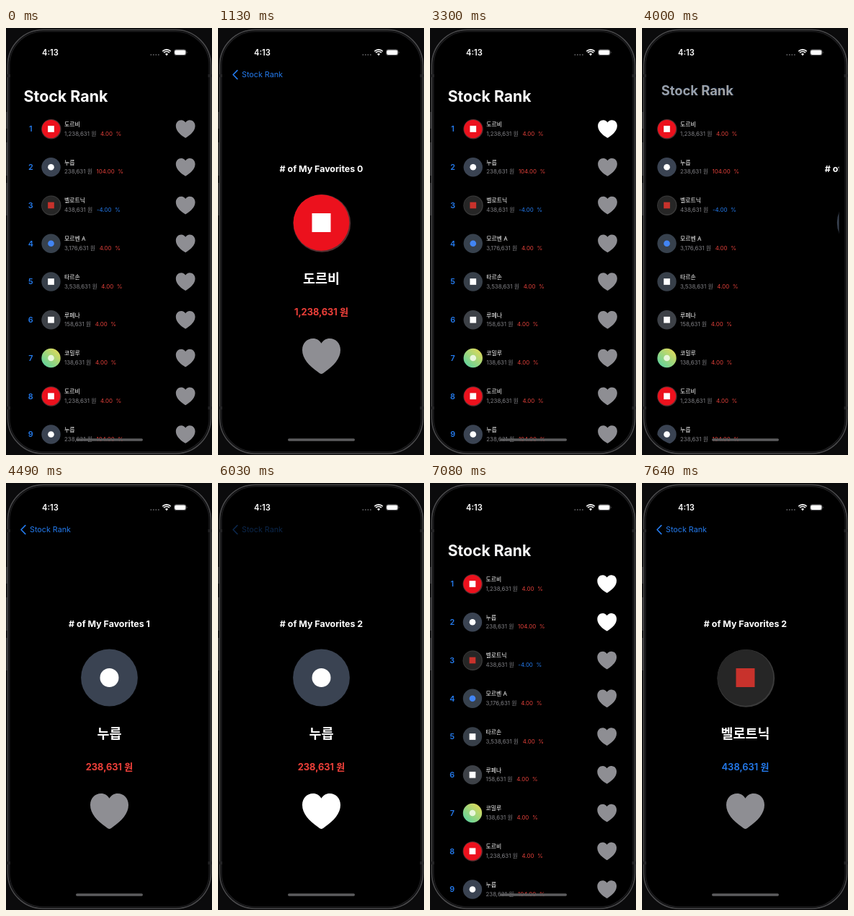
These frames come from a looping animation (286 by 590 pixels, 8000 ms). An HTML page:

```html
<!DOCTYPE html>
<html lang="ko">
<head>
<meta charset="utf-8">
<title>Stock Rank</title>
<style>
  html, body { margin: 0; width: 100%; height: 100%; overflow: hidden; background: #0b0b0c; }
  svg { display: block; width: 286px; height: 590px; }
  text { font-family: Inter, "Noto Sans CJK KR", "Noto Sans CJK", sans-serif; white-space: pre; }
</style>
</head>
<body>
<svg id="stage" viewBox="0 0 286 590"></svg>
<script>
const LOOP = 8000, TICK = 70, PHASE = 10;
const LEFT = 13.5, WIDTH = 260, MID = 143.5;
const BLUE = '#247bee', RED = '#e2403a', GRAY = '#8e8e93';

// name, price, change, disc, mark colour, mark shape, rim
const stocks = [
  ['도르비', '1,238,631', '4.00', '#ec111d', '#fff', 'square', '#553032'],
  ['누릅', '238,631', '104.00', '#3a4352', '#fff', 'circle'],
  ['벨로트닉', '438,631', '-4.00', '#262626', '#c8322c', 'square', '#3a3a3a'],
  ['모르벤 A', '3,176,631', '4.00', '#37414d', '#4285f4', 'circle'],
  ['타르손', '3,538,631', '4.00', '#373f49', '#fff', 'square'],
  ['루페나', '158,631', '4.00', '#3d4147', '#fff', 'square'],
  ['코밀루', '138,631', '4.00', 'url(#meadow)', '#e9f7dc', 'circle'],
].map(([name, price, change, disc, mark, shape, rim]) =>
  ({ name, price: price + ' 원', change, disc, mark, shape, rim,
     tone: change[0] === '-' ? BLUE : RED }));

// start, end, time already run at the first step, direction
const moves = [
  [500, 1130, 12, 1],
  [3020, 3510, 90, 0],
  [4000, 4490, 90, 1],
  [6170, 6660, 90, 0],
  [7080, 7640, 24, 1],
];
const taps = [[1900, 2250], [4980, 5400]];
const presses = [[2880, 3020], [6030, 6170]];
const pageEnds = [3510, 6660, Infinity];

const label = (x, y, size, str, attrs = '') =>
  `<text x="${x}" y="${y + size * 0.36}" font-size="${size}" fill="#fff" ${attrs}>${str}</text>`;

const centered = (y, size, str, attrs = '') =>
  label(MID, y, size, str, `text-anchor="middle" font-weight="600" ${attrs}`);

function badge(s, x, y, r) {
  const m = r * 0.33, o = r * 0.02;
  const rim = s.rim ? `<circle cx="${x + o}" cy="${y + o}" r="${r + 0.5}" fill="${s.rim}"/>` : '';
  const inner = s.rim ? r - 0.6 : r;
  const mark = s.shape === 'circle'
    ? `<circle cx="${x}" cy="${y}" r="${m}" fill="${s.mark}"/>`
    : `<rect x="${x - m}" y="${y - m}" width="${2 * m}" height="${2 * m}" fill="${s.mark}"/>`;
  return `${rim}<circle cx="${x}" cy="${y}" r="${inner}" fill="${s.disc}"/>${mark}`;
}

const heart = (x, y, k, cls) =>
  `<use href="#heart" class="${cls}" fill="${GRAY}" transform="translate(${x} ${y}) scale(${k})"/>`;

function row(i) {
  const s = stocks[i % stocks.length], y = 139.5 + 52.75 * i;
  return label(34.3, y, 10.8, i + 1, `text-anchor="middle" font-weight="600" style="fill:${BLUE}"`)
    + badge(s, 62.5, y, 13.2)
    + label(81, y - 6.5, 7.9, s.name)
    + label(81, y + 6.3, 7.9,
        `<tspan fill="#808085">${s.price}</tspan><tspan dx="5.7" fill="${s.tone}">${s.change}</tspan>` +
        `<tspan dx="4.6" fill="${s.tone}">%</tspan>`)
    + heart(249.2, y, 0.505, 'rowHeart');
}

function page(s) {
  const glow = s.tone === RED ? 'filter:drop-shadow(.9px .9px .7px #c0201c)' : '';
  return `<g class="page"><rect x="${LEFT}" y="0" width="${WIDTH}" height="590"/>`
    + centered(195, 12.4, '', 'class="count" style="font-weight:700"')
    + badge(s, MID, 269, 39.4)
    + centered(346, 18.5, s.name)
    + centered(392.8, 13, s.price, `style="fill:${s.tone};${glow}"`)
    + heart(MID, 453.5, 1, 'pageHeart') + '</g>';
}

const side = (y, h) => `<rect x="0" y="${y}" width="2" height="${h}" fill="#2c2c2e"/>`;
const seam = y => [2, 280.5].map(x =>
  `<rect x="${x}" y="${y}" width="4" height="4" fill="#232325"/>`).join('');
const dots = [0, 1, 2, 3].map(i =>
  `<circle cx="${201.3 + 3.5 * i}" cy="37" r="1" fill="#58585a"/>`).join('');
const arcs = [[2.9, 2.9], [5.6, 1.7], [8.2, 1.7]].map(([r, w], i) => {
  const a = r * 0.7;
  return i
    ? `<path d="M${223 - a} ${38 - a}A${r} ${r} 0 0 1 ${223 + a} ${38 - a}" fill="none" stroke="#fff" stroke-width="${w}"/>`
    : `<path d="M223 38.3L${223 - a} ${38 - a}A${r} ${r} 0 0 1 ${223 + a} ${38 - a}Z" fill="#fff"/>`;
}).join('');

document.getElementById('stage').innerHTML = `
  <defs>
    <clipPath id="screen"><rect x="${LEFT}" y="12" width="${WIDTH}" height="564" rx="36"/></clipPath>
    <linearGradient id="meadow" x1="0.15" y1="0.9" x2="0.85" y2="0.1">
      <stop offset="0" stop-color="#62d39c"/><stop offset="1" stop-color="#dcd95c"/>
    </linearGradient>
    <path id="heart" transform="translate(-26.5 -24.5)" d="M26.5 49C25.5 49 24.5 48.3 22 46.5
      C9 37.5 0 27.5 0 16C0 6.5 6.5 0 15 0C20 0 24 2.6 26.5 6.8C29 2.6 33 0 38 0
      C46.5 0 53 6.5 53 16C53 27.5 44 37.5 31 46.5C28.5 48.3 27.5 49 26.5 49Z"/>
  </defs>
  ${side(116, 23)}${side(158, 46)}${side(214, 45)}
  <rect x="2.5" y="2.5" width="282" height="585.5" rx="49" fill="#000" stroke="#4b4b4d" stroke-width="1.5"/>
  <rect x="4.8" y="4.8" width="277.4" height="581" rx="46.5" fill="none" stroke="#1b1b1d" stroke-width="1.6"/>
  ${seam(64)}${seam(523)}
  <g clip-path="url(#screen)">
    <g id="list">${Array.from({ length: 9 }, (_, i) => row(i)).join('')}</g>
    ${stocks.slice(0, 3).map(page).join('')}
    <g id="title">${label(0, 0, 21.4, 'Stock Rank', 'font-weight="700"')}</g>
    <g id="back">
      <path id="chevron" d="M26.8 58.6L21 64.5L26.8 70.4" fill="none" stroke="${BLUE}"
        stroke-width="1.6" stroke-linecap="round" stroke-linejoin="round"/>
      <g id="backText">${label(0, 0, 10.75, 'Stock Rank', `style="fill:${BLUE}"`)}</g>
    </g>
  </g>
  ${label(50, 34, 11.2, '4:13', 'font-weight="600"')}
  ${dots}${arcs}
  <rect x="233.6" y="29.8" width="16.4" height="7.9" rx="2.5" fill="none" stroke="#77777a" stroke-width=".7"/>
  <rect x="234.2" y="30.4" width="15.2" height="6.7" rx="2" fill="#fff"/>
  <path d="M251 32.4Q252.3 33.7 251 35.1Z" fill="#77777a"/>
  <rect x="97" y="567.3" width="93" height="3.4" rx="1.7" fill="#5c5c5e"/>`;

const $ = id => document.getElementById(id);
const all = cls => [...document.querySelectorAll('.' + cls)];
const list = $('list'), title = $('title'), back = $('back');
const chevron = $('chevron'), backText = $('backText');
const pages = all('page'), counts = all('count');
const rowHearts = all('rowHeart'), pageHearts = all('pageHeart');

const mix = (a, b, k) => a + (b - a) * k;
const within = (t, [a, b]) => t >= a && t < b;
const spring = ms => { const u = 0.014 * ms; return 1 - (1 + u) * Math.exp(-u); };

function pushed(t) {
  let x = 0;
  for (const [a, b, lead, dir] of moves) {
    if (t < a) break;
    const p = t < b ? spring(t - a + lead) : 1;
    x = dir ? p : 1 - p;
  }
  return x;
}

function draw(time) {
  const t = PHASE + Math.floor((time - PHASE) / TICK) * TICK;
  const x = pushed(t), nav = x ** 1.25;
  const open = pageEnds.findIndex(end => t < end);
  const liked = taps.map(([a]) => t >= a + TICK);

  list.setAttribute('transform', `translate(${-0.3 * WIDTH * x} 0)`);
  list.style.display = x === 1 ? 'none' : '';
  pages.forEach((p, i) => {
    p.style.display = i === open && x > 0 ? '' : 'none';
    p.setAttribute('transform', `translate(${WIDTH * (1 - x)} 0)`);
  });
  counts[open].textContent = '# of My Favorites ' + liked.filter(Boolean).length;

  liked.forEach((on, i) => {
    const color = on ? '#fff' : GRAY, [a, b] = taps[i];
    rowHearts[i].setAttribute('fill', color);
    pageHearts[i].setAttribute('fill', color);
    pageHearts[i].style.opacity = within(t, taps[i]) ? mix(0.35, 1, (t - a) / (b - a)) : 1;
  });

  // The large title shrinks into the back label.
  const place = `translate(${mix(24.5, 33, nav)} ${mix(94.5, 64.5, nav)})`;
  const ratio = 56 / 117, k = mix(1, ratio, nav);
  title.setAttribute('transform', `${place} scale(${k})`);
  title.style.opacity = (1 - nav) ** 1.35;
  backText.setAttribute('transform', `${place} scale(${k / ratio})`);
  backText.style.opacity = nav ** 1.5;
  chevron.style.opacity = Math.max(0, nav * 2 - 1);
  back.style.opacity = presses.some(p => within(t, p)) ? 0.31 : 1;
}

const born = performance.now();
function frame() {
  draw((performance.now() - born) % LOOP);
  requestAnimationFrame(frame);
}
frame();
</script>
</body>
</html>
```
